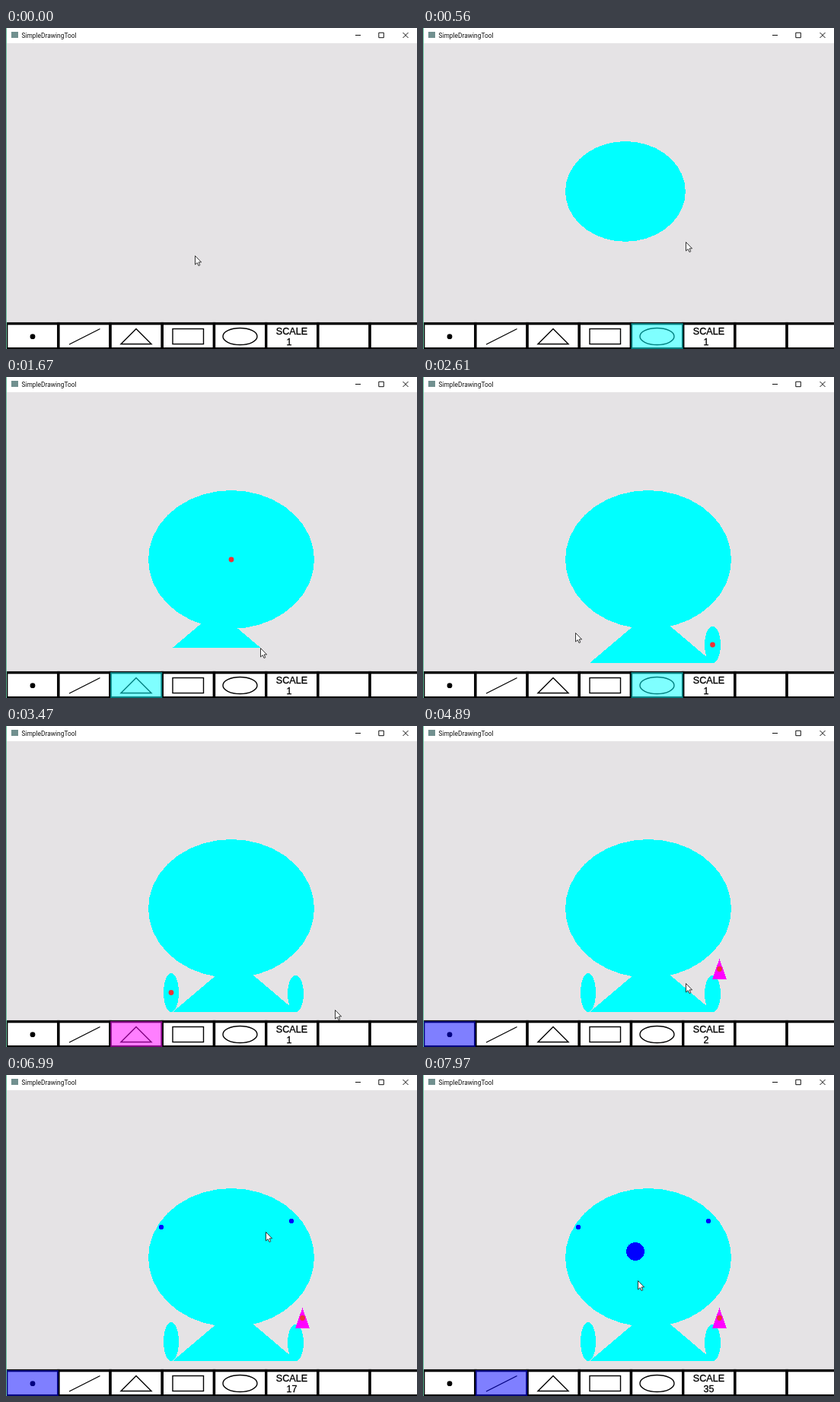
Write an HTML page that moves like this. It is 540 px wide and 422 px high and loops after 8000 ms.

```html
<!DOCTYPE html>
<html lang="en">
<head>
<meta charset="utf-8">
<title>SimpleDrawingTool</title>
<style>
  html, body { margin: 0; width: 100%; height: 100%; overflow: hidden; background: #e5e3e5; }
  svg { display: block; width: 540px; height: 422px; }
  .title { font: 8.4px Roboto, sans-serif; fill: #111; }
  .scale { font: 12.6px "Liberation Sans", Arial, sans-serif; stroke: #000; stroke-width: .3px; }
  .icon { fill: none; stroke: #000; stroke-width: 1.4; }
  .cells { fill: #fff; stroke: #000; stroke-width: 3.4; }
</style>
</head>
<body>
<svg viewBox="0 0 540 422">
  <rect width="540" height="422" fill="#e5e3e5"/>
  <rect width="540" height="20" fill="#fff"/>
  <rect x="7" y="5" width="9" height="8" fill="#71908f"/>
  <text class="title" x="20.5" y="12.5">SimpleDrawingTool</text>
  <g fill="none" stroke="#111">
    <path d="M459 9.5h7M489.800 6.200h6.500v6.500h-6.500z"/>
    <path d="M521.500 6l7 7m0-7l-7 7"/>
  </g>

  <g id="shapes" shape-rendering="crispEdges"></g>
  <circle id="mark" r="3.400" fill="#ec3338"/>

  <g id="cells" class="cells"></g>
  <circle cx="35" cy="405.700" r="3.400"/>
  <g class="icon">
    <path d="M83 416L123.500 395.500M151 415.500L171 395.500L191 415.500Z"/>
    <rect x="219" y="395.500" width="40.500" height="20"/>
    <ellipse cx="307.500" cy="405.500" rx="22.500" ry="11"/>
  </g>
  <g class="scale">
    <text x="354.800" y="402.500">SCALE</text>
    <text id="count" x="368.500" y="416.500">1</text>
  </g>
  <rect id="highlight" y="388" width="68.200" height="34" opacity=".5"/>
  <rect width="1" height="422" fill="#66bd9c"/>

  <path id="cursor" d="M.5.5V12L3.200 9.600L5 13.500L6.800 12.700L5.100 8.900H8.600Z"
        fill="#fff" stroke="#222" stroke-width=".9"/>
</svg>
<script>
const LOOP = 8000;
const CYAN = '#00ffff', MAGENTA = '#ff00ff', BLUE = '#0000ff';
const POINT = 0, LINE = 1, TRIANGLE = 2, ELLIPSE = 4;
const OUTLINES = {
  [TRIANGLE]: [[0, -1], [-1, 1], [1, 1]],
  [ELLIPSE]: Array.from({ length: 36 }, (_, i) => [Math.cos(i * Math.PI / 18), Math.sin(i * Math.PI / 18)])
};

const $ = id => document.getElementById(id);
const clamp = (v, low, high) => Math.min(high, Math.max(low, v));
const cellX = i => 0.7 + i * 68.2;

function set(el, attrs) {
  for (const name in attrs) el.setAttribute(name, attrs[name]);
  return el;
}
function add(parent, tag, attrs) {
  const el = document.createElementNS('http://www.w3.org/2000/svg', tag);
  return parent.appendChild(set(el, attrs));
}
function show(el, on) {
  set(el, { visibility: on ? 'visible' : 'hidden' });
}

for (let i = 0; i < 8; i++) {
  add($('cells'), 'rect', { x: cellX(i), y: 388.6, width: 68.2, height: 33 });
}

// The session is recorded in order by these four actions.
const path = [], picks = [], shapes = [];
let color = CYAN, tool = ELLIPSE;

function move(t, x, y) {
  path.push({ t, x, y });
}
function pick(t, newTool, newColor = color) {
  tool = newTool;
  color = newColor;
  picks.push({ t, tool, color });
}
function drag(press, release, from, to) {
  move(press, ...from);
  move(release, ...to);
  const el = add($('shapes'), 'polygon', { fill: color });
  shapes.push({ el, press, release, from, outline: OUTLINES[tool] });
}
function dot(t, cx, cy, r) {
  move(t, cx, cy);
  shapes.push({ el: add($('shapes'), 'circle', { cx, cy, r, fill: color }), press: t });
}

move(0, 248, 299);
pick(180, ELLIPSE, CYAN);
drag(260, 720, [187, 149], [405, 331]);
move(900, 409, 341);
pick(1150, TRIANGLE);
drag(1350, 1850, [219, 307], [382, 376]);
pick(2010, ELLIPSE);
drag(2100, 2450, [370, 328], [391, 376]);
move(2610, 200, 336);
drag(2700, 3010, [207, 325], [227, 376]);
pick(3200, ELLIPSE, MAGENTA);
pick(3340, TRIANGLE);
move(3470, 432, 373);
drag(3590, 3850, [399, 333], [380, 306]);
move(4030, 385, 307);
pick(4350, POINT);
move(4500, 345, 338);
pick(4670, POINT, BLUE);
move(4890, 345, 338);
move(5790, 208, 208);
move(5960, 208, 208);
dot(6120, 204, 200, 3);
move(6500, 407, 196);
dot(6720, 375, 192, 3);
dot(7400, 279, 232, 12);
pick(7630, LINE);
move(7760, 282, 270);
move(LOOP, 282, 270);

function pointerAt(t) {
  const i = Math.max(1, path.findIndex(p => p.t > t));
  const a = path[i - 1], b = path[i];
  const u = (t - a.t) / (b.t - a.t), k = u * u * (3 - 2 * u);
  return [a.x + (b.x - a.x) * k, a.y + (b.y - a.y) * k];
}

// Number of key repeats since the key went down.
function repeats(t, start, interval, limit) {
  return clamp(Math.floor((t - start) / interval) + 1, 0, limit);
}
function scaleAt(t) {
  return 1 + repeats(t, 4890, 101, 9) + repeats(t, 6770, 32, 24) + repeats(t, 7970, 1, 1);
}

function stretch(shape, t) {
  const [ax, ay] = shape.from;
  const [bx, by] = pointerAt(Math.min(t, shape.release));
  const cx = (ax + bx) / 2, cy = (ay + by) / 2;
  const rx = Math.abs(bx - ax) / 2, ry = Math.abs(by - ay) / 2;
  set(shape.el, { points: shape.outline.map(([x, y]) => [cx + x * rx, cy + y * ry]).join(' ') });
  if (t >= shape.release) {
    set($('mark'), { cx, cy });
    show($('mark'), true);
  }
}

function draw(t) {
  show($('mark'), false);
  for (const shape of shapes) {
    show(shape.el, t >= shape.press);
    if (shape.outline && t >= shape.press) stretch(shape, t);
  }
  const current = picks.filter(p => p.t <= t).pop();
  show($('highlight'), current);
  if (current) set($('highlight'), { x: cellX(current.tool), fill: current.color });
  $('count').textContent = scaleAt(t);
  set($('cursor'), { transform: `translate(${pointerAt(t).map(Math.round)})` });
}

const start = performance.now();
function tick() {
  draw((performance.now() - start) % LOOP);
  requestAnimationFrame(tick);
}
tick();
</script>
</body>
</html>
```
